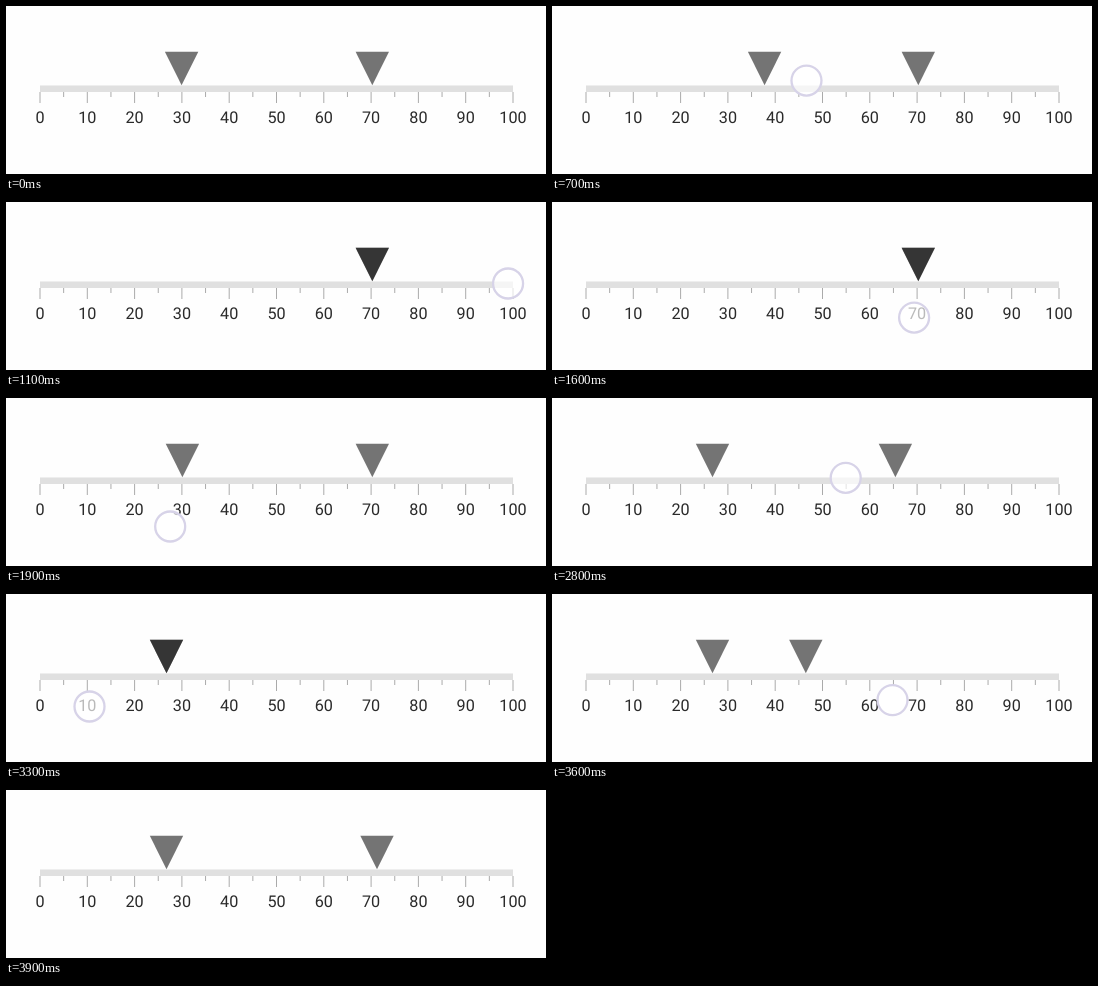
Write an HTML page that moves like this. It is 540 by 168 pixels and loops after 4 s.

```html
<!DOCTYPE html>
<html lang="en">
<head>
<meta charset="utf-8">
<title>Linear gauge with two draggable pointers</title>
<style>
  html, body { margin: 0; width: 100%; height: 100%; overflow: hidden; background: #fefefe; }
  svg { display: block; width: 540px; height: 168px; }
  text {
    font: 16.2px Roboto, sans-serif; fill: #2a2a2a;
    text-anchor: middle; text-rendering: geometricPrecision;
  }
  .pointer { fill: #000; fill-opacity: .54; }
  #touch { fill: #fff; fill-opacity: .68; stroke: #d7d3e8; stroke-width: 2.3; }
</style>
</head>
<body>
<svg viewBox="0 0 540 168">
  <rect x="34" y="79.5" width="473" height="6.5" fill="#e0e0e0"/>
  <g id="scale"></g>
  <path class="pointer" id="low" d="M-16.7 45.7H16.7L0 79.3Z"/>
  <path class="pointer" id="high" d="M-16.7 45.7H16.7L0 79.3Z"/>
  <circle id="touch" r="15"/>
</svg>
<script>
const LOOP = 4000, STEP = 100, LAG = 75;
const LOW_END = 160.5, HIGH_START = 366.3, HIGH_END = 371;
const byId = id => document.getElementById(id);
const toX = value => 34 + value * 4.73;

function add(tag, attrs, text = '') {
  const node = document.createElementNS('http://www.w3.org/2000/svg', tag);
  for (const key in attrs) node.setAttribute(key, attrs[key]);
  node.textContent = text;
  byId('scale').append(node);
}

for (let value = 0; value <= 100; value += 5) {
  const major = value % 10 === 0;
  add('line', { x1: toX(value), x2: toX(value), y1: 86, y2: major ? 97 : 91, stroke: '#aaa' });
  if (major) add('text', { x: toX(value), y: 117 }, value);
}

// Key points of the finger during each drag: [time, position]
const lowDrag = {
  x: [[420, 175.6], [1220, 511], [1400, 511], [1825, 176.4], [1940, LOW_END]],
  y: [[420, 71], [1100, 81.5], [1900, 128.5]]
};
const highDrag = {
  x: [[2600, HIGH_START], [3150, 83.5], [3300, 83.5], [3720, 384]],
  y: [[2600, 68], [3150, 114], [3300, 112.5], [3720, 105]]
};

const clamp = (value, min, max) => Math.min(max, Math.max(min, value));
const ease = t => t * t * t * (t * (6 * t - 15) + 10);

// Eased move from key to key, held before the first and after the last
function follow(keys, time) {
  let value = keys[0][1];
  for (let i = 1; i < keys.length; i++) {
    const [t0, v0] = keys[i - 1], [t1, v1] = keys[i];
    value += (v1 - v0) * ease(clamp((time - t0) / (t1 - t0), 0, 1));
  }
  return value;
}

function place(id, x, y = 0) {
  byId(id).setAttribute('transform', `translate(${x} ${y})`);
}

function draw(now) {
  const time = Math.floor((now % LOOP) / STEP) * STEP;
  const drag = time < 2600 ? lowDrag : highDrag;
  // Pointers trail the finger and cannot pass each other
  place('low', clamp(follow(lowDrag.x, time - LAG), LOW_END, HIGH_START));
  place('high', clamp(follow(highDrag.x, time - LAG), LOW_END, HIGH_END));
  place('touch', follow(drag.x, time), follow(drag.y, time));
  byId('touch').setAttribute('opacity', time >= 200 && time < 3900 ? 1 : 0);
}

const start = performance.now();
function tick() {
  draw(performance.now() - start);
  requestAnimationFrame(tick);
}
tick();
</script>
</body>
</html>
```
